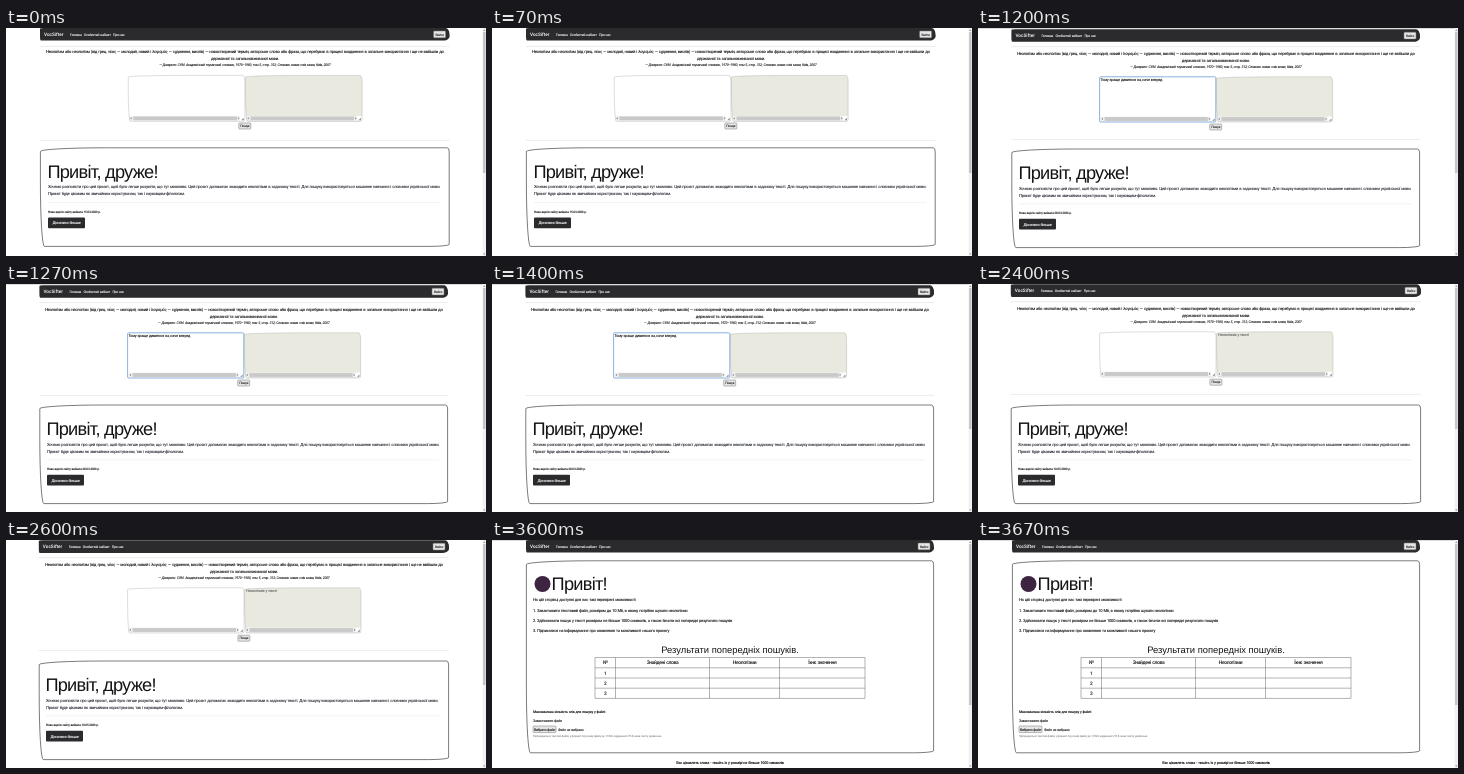
Animation of 480 by 228 pixels, one loop 4.79 s. Source, as an HTML page:

```html
<!DOCTYPE html>
<html lang="uk">
<head>
<meta charset="utf-8">
<title>Пошук неологізмів</title>
<style>
html, body { margin: 0; width: 100%; height: 100%; overflow: hidden; background: #fff; }
svg { display: block; width: 100vw; height: 100vh; }
text {
  font-family: Roboto, "Liberation Sans", sans-serif;
  font-weight: 500;
  letter-spacing: -.08em;
  word-spacing: .12em;
  text-rendering: geometricPrecision;
  white-space: pre;
}
.head { font: 400 18.2px "Liberation Sans", sans-serif; letter-spacing: -.04em; word-spacing: 0; }
.title { font-family: "Liberation Sans", sans-serif; font-weight: 400; letter-spacing: 0; word-spacing: 0; }
.brand { letter-spacing: 0; }
.bold { font-weight: 700; }
.ital { font-style: italic; }
</style>
</head>
<body>
<svg id="stage" viewBox="0 0 480 228" preserveAspectRatio="none"></svg>
<script>
const LOOP = 4790;
const STARTS = [0, 1200, 2400, 3600];
const DARK = '#2b2b2e';
const INK = '#141414';

const rect = (x, y, w, h, fill, rx = 0) =>
  `<rect x="${x}" y="${y}" width="${w}" height="${h}" rx="${rx}" fill="${fill}"/>`;

const line = (x1, y1, x2, y2, color = '#e4e4e4', width = .7) =>
  `<path d="M${x1} ${y1}L${x2} ${y2}" stroke="${color}" stroke-width="${width}"/>`;

const text = (x, y, size, str, { cls = '', fill = INK, mid = false } = {}) =>
  `<text x="${x}" y="${y}" font-size="${size}" class="${cls}" fill="${fill}"` +
  `${mid ? ' text-anchor="middle"' : ''}>${str}</text>`;

// Corner radii (x, then y), clockwise from top left
const CARD = [[64, 2, 20, 4], [3.6, 4, 2, 64]];
const FIELD = [[60, 2, 2, 2], [1.6, 6, 2, 30]];
const PLAIN = [[1, 1, 1, 1], [1, 1, 1, 1]];
const BAR = [[4, 4, 7, 1], [1, 7, 4, 4]];

function sketch(x, y, w, h, [rx, ry], fill, stroke = 'none', width = .6) {
  const [a, b, c, d] = rx;
  const [p, q, r, s] = ry;
  const X = x + w, Y = y + h;
  return `<path d="M${x + a} ${y}H${X - b}A${b} ${q} 0 0 1 ${X} ${y + q}V${Y - r}` +
    `A${c} ${r} 0 0 1 ${X - c} ${Y}H${x + d}A${d} ${s} 0 0 1 ${x} ${Y - s}V${y + p}` +
    `A${a} ${p} 0 0 1 ${x + a} ${y}Z" fill="${fill}" stroke="${stroke}" stroke-width="${width}"/>`;
}

function button(x, y, w, h, label, size = 3.3) {
  return `<rect x="${x}" y="${y}" width="${w}" height="${h}" rx=".8" fill="#e6e6e6" stroke="#777" stroke-width=".5"/>` +
    text(x + w / 2, y + h / 2 + 1.2, size, label, { mid: true });
}

function nav(x, y, right, h) {
  const base = y + h / 2 + 1.4;
  const links = [[30, 'Головна'], [44, 'Особистий кабінет'], [73, 'Про нас']];
  return sketch(x, y, right - x, h, BAR, DARK) +
    text(x + 4, base, 4.7, 'VocSifter', { cls: 'brand', fill: '#fff' }) +
    links.map(([dx, s]) => text(x + dx, base, 3.5, s, { fill: '#fff' })).join('') +
    button(right - 16, y + 3, 12, 6.8, 'Вийти');
}

function pageBar(end) {
  return rect(476.6, 0, 3.4, 228, '#f1f1f1') + rect(477.1, 4, 2.4, end - 4, '#c3c3c3') +
    '<path d="M477.2 2.8l1.1-1.4 1.1 1.4zM477.2 225.4l1.1 1.4 1.1-1.4z" fill="#777"/>';
}

function area(x, y, w, h, fill, focus) {
  const by = y + h - 5.4;
  const end = x + w - 5;
  const shape = focus ? PLAIN : FIELD;
  return sketch(x, y, w, h, shape, fill) +
    rect(x + 1, by, w - 5.5, 4.8, '#f0f0f0') +
    rect(x + 5, by + .5, w - 13, 3.8, '#c9c9c9') +
    rect(end, by, 4.6, 4.8, '#fff') +
    `<path d="M${x + 3.4} ${by + 1.2}l-1.6 1.1 1.6 1.1zM${end - 2} ${by + 1.2}l1.6 1.1-1.6 1.1z` +
    `M${end + 3.8} ${by + 1.8}v2.4h-2.4z" fill="#888"/>` +
    sketch(x, y, w, h, shape, 'none', focus ? '#6f9fd6' : '#aaa', focus ? .8 : .4);
}

const QUOTE = [
  'Неологізм або неологізм (від грец. νέος — молодий, новий і λογισμός — судження, вислів) — новостворений термін, авторське слово або фраза, що перебуває в процесі входження в загальне використання і ще не ввійшли до',
  'державної та загальновживаної мови.',
  '— Джерело: СУМ. Академічний тлумачний словник, 1970–1980, том 5, стор. 312; Словник нових слів мови, Київ, 2007'
];
const ABOUT = [
  'Хочемо розповісти про цей проєкт, щоб було легше розуміти, що тут можливо. Цей проєкт допомагає знаходити неологізми в заданому тексті. Для пошуку використовується машинне навчання і словники української мови.',
  'Проєкт буде цікавим як звичайним користувачам, так і науковцям-філологам.'
];

function search(o) {
  const { x, right, top, quote, box, card, left } = o;
  const cx = (x + right) / 2;
  const [ax, ay, aw, ah] = box;
  return (o.edge ? line(0, .4, 477, .4, '#c8c8c8') : '') +
    nav(x, top, right, 12.6) +
    line(x, o.rules[0], right, o.rules[0]) +
    text(cx, quote + 1.4, 4.28, QUOTE[0], { mid: true }) +
    text(cx, quote + 8.2, 4.28, QUOTE[1], { mid: true }) +
    text(cx, quote + 14, 3.65, QUOTE[2], { mid: true, cls: 'ital' }) +
    area(ax + aw + .6, ay, aw, ah, '#e9e9df') +
    area(ax, ay, aw, ah, '#fff', o.focus) +
    (o.input ? text(ax + 1, ay + 4.2, 3.9, o.input) : '') +
    (o.output ? text(ax + aw + 2, ay + 4.2, 3.8, o.output, { fill: '#666' }) : '') +
    button(cx - 6, o.send, 12, 6, 'Пошук') +
    line(x, o.rules[1], right, o.rules[1]) +
    sketch(x + .4, card, right - x - .8, 98.6, CARD, '#fff', '#222') +
    text(left - .6, card + 30.3, 18.2, 'Привіт, друже!', { cls: 'head' }) +
    text(left, card + 40.6, 4.24, ABOUT[0], { fill: '#2a2f36' }) +
    text(left, card + 47.6, 4.24, ABOUT[1], { fill: '#2a2f36' }) +
    line(left, card + 54.8, right - 9, card + 54.8, '#ececec') +
    text(left, card + 64.9, 3.2, o.stamp, { cls: 'bold' }) +
    rect(left, card + 69.8, 37, 10.6, DARK, 1) +
    text(left + 18.5, card + 76.5, 3.9, 'Дізнатися більше', { fill: '#fff', mid: true }) +
    pageBar(145);
}

function results() {
  const cols = [103, 123.5, 217.5, 287.5, 373];
  const rows = [117.5, 127.8, 138, 148.2, 158.4];
  const mids = cols.slice(1).map((c, i) => (c + cols[i]) / 2);
  const heads = ['№', 'Знайдені слова', 'Неологізми', 'Їхнє значення'];
  const items = [
    [61.4, 'На цій сторінці доступні для вас такі перевірені можливості:'],
    [71.8, '1. Завантажити текстовий файл, розміром до 10 Мб, в якому потрібно шукати неологізми'],
    [82.2, '2. Здійснювати пошук у тексті розміром не більше 1000 символів, а також бачити всі попередні результати пошуків'],
    [91.9, '3. Підписатися на інформування про оновлення та можливості нашого проєкту']
  ];
  return line(0, .4, 477, .4, '#c8c8c8') +
    nav(34, 0, 442, 12.6) +
    sketch(34.4, 20.8, 407.2, 192, CARD, '#fff', '#222') +
    '<circle cx="50.5" cy="44" r="8" fill="#3d2440"/>' +
    text(59.6, 50.4, 18.2, 'Привіт!', { cls: 'head' }) +
    items.map(([y, s]) => text(41, y, 4.15, s)).join('') +
    text(238, 113, 9.4, 'Результати попередніх пошуків.', { cls: 'title', mid: true }) +
    cols.map(c => line(c, rows[0], c, rows[4], '#666', .5)).join('') +
    rows.map(r => line(cols[0], r, cols[4], r, '#666', .5)).join('') +
    heads.map((s, i) => text(mids[i], 124.2, 5, s, { mid: true })).join('') +
    [1, 2, 3].map(n => text(mids[0], rows[n] + 6.8, 4.8, n, { mid: true })).join('') +
    text(41, 173.2, 3.6, 'Максимальна кількість слів для пошуку у файлі:', { cls: 'bold' }) +
    text(41, 182.4, 3.7, 'Завантажити файл') +
    button(41, 186, 23, 6.6, 'Вибрати файл', 3.7) +
    text(66, 190.5, 3.6, 'Файл не вибрано') +
    text(41, 196.7, 2.8, 'Підтримуються текстові файли у форматі txt, розмір файлу до 10 Мб, кодування UTF-8, мова тексту українська', { fill: '#888' }) +
    text(238, 223.8, 3.9, 'Вас цікавлять слова - пишіть їх у розмірі не більше 1000 символів', { cls: 'bold', mid: true }) +
    pageBar(165);
}

const scenes = [
  search({
    x: 34, right: 443.6, top: 0, quote: 24, rules: [18.4, 112.4],
    box: [122.3, 47.4, 116.6, 46], send: 95, card: 119.8, left: 42,
    stamp: 'Нова версія сайту вийшла 15.03.2020 р.'
  }),
  search({
    x: 33.4, right: 442, top: 1.2, quote: 25.6, rules: [18.6, 111.4],
    box: [121.6, 48.8, 116.2, 45.2], send: 96, card: 121, left: 41, edge: true, focus: true,
    input: 'Тому краще дивитися на, наче вперед',
    stamp: 'Нова версія сайту вийшла 08.03.2020 р.'
  }),
  search({
    x: 32.8, right: 443, top: .3, quote: 24.8, rules: [17.6, 110.4],
    box: [121.6, 47.8, 116.4, 45.2], send: 95.2, card: 121, left: 40,
    output: 'Неологізмів у тексті',
    stamp: 'Нова версія сайту вийшла 10.05.2020 р.'
  }),
  results()
];

const stage = document.getElementById('stage');
stage.innerHTML = rect(0, 0, 480, 228, '#fff') +
  scenes.map(s => `<g class="scene" visibility="hidden">${s}</g>`).join('');
const groups = [...stage.querySelectorAll('.scene')];

const start = performance.now();
function draw(now) {
  const t = Math.max(0, now - start) % LOOP;
  const current = STARTS.filter(s => s <= t).length - 1;
  groups.forEach((g, i) => g.setAttribute('visibility', i === current ? 'visible' : 'hidden'));
  requestAnimationFrame(draw);
}
draw(start);
</script>
</body>
</html>
```
